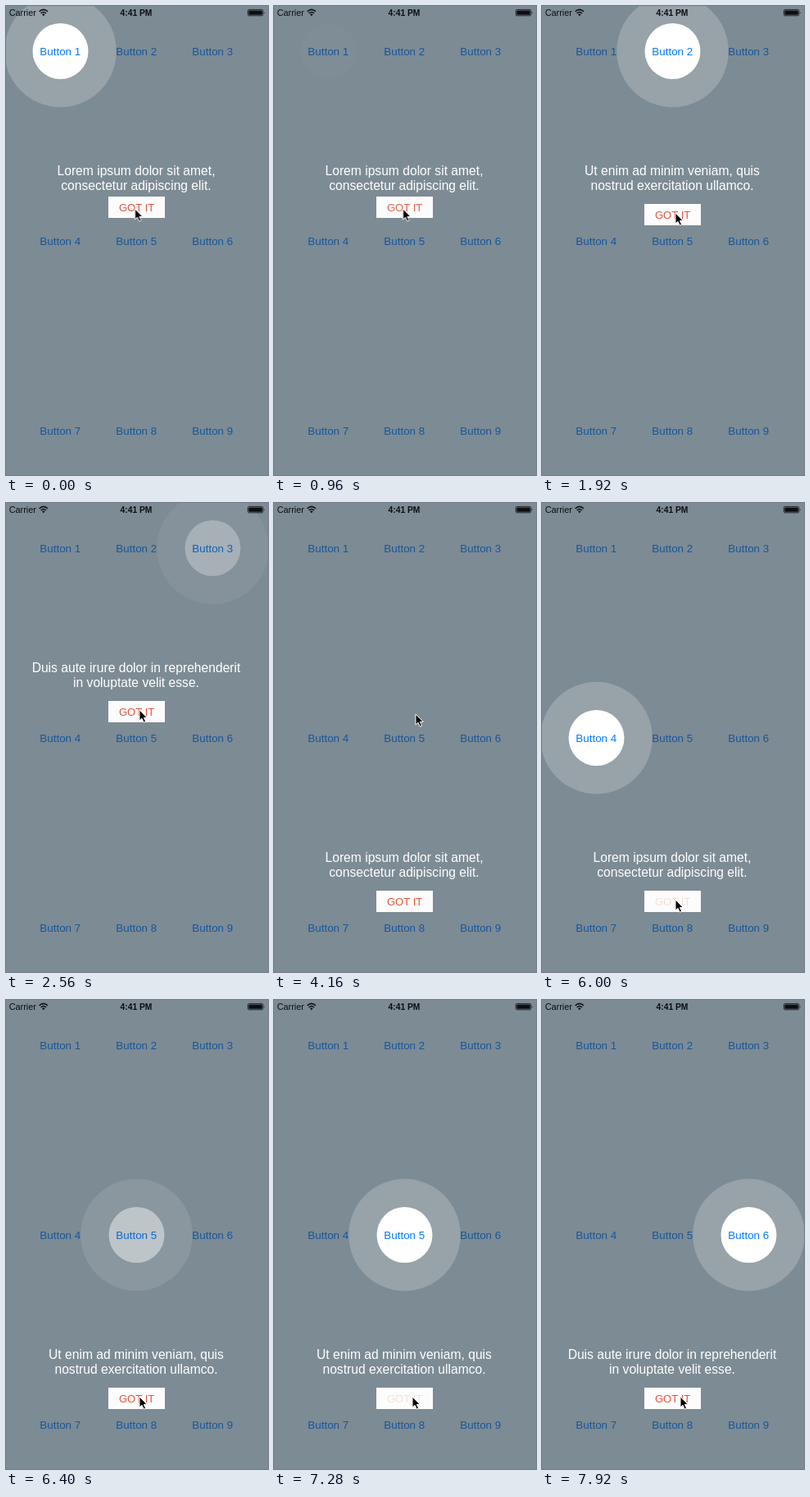
Write an HTML page that moves like this. It is 320 px wide and 571 px high and loops after 8 s.

```html
<!DOCTYPE html>
<html lang="en">
<head>
<meta charset="utf-8">
<title>Coach marks</title>
<style>
  @property --x { syntax: "<length>"; inherits: true; initial-value: 66.5px; }
  @property --y { syntax: "<length>"; inherits: true; initial-value: 55px; }

  html, body { margin: 0; width: 100%; height: 100%; overflow: hidden; background: #7d8b94; }
  body { position: relative; font-family: "Liberation Sans", Arial, sans-serif; }
  svg, div { position: absolute; left: 0; top: 0; width: 320px; height: 571px; }
  text { text-anchor: middle; }

  .labels { font-size: 13.4px; }
  .dim { fill: #17569a; }

  /* spotlight: a halo around a hole through the overlay */
  .focus { animation: spot 8s step-end infinite, fade 8s ease-in-out infinite; }
  .halo { background: #fff; opacity: .2; clip-path: circle(68.3px at var(--x) var(--y)); }
  .hole { background: #fff; fill: #007aff; clip-path: circle(34px at var(--x) var(--y)); }

  .card { animation: drop 8s step-end infinite; }
  .msg { font-size: 15.65px; fill: #fff; opacity: 0; }
  .msg1 { animation: msg1 8s step-end infinite; }
  .msg2 { animation: msg2 8s step-end infinite; }
  .msg3 { animation: msg3 8s step-end infinite; }
  .btn { animation: nudge 8s step-end infinite; }
  .btn text { font-size: 13.1px; fill: #e2553b; animation: press 8s linear infinite; }

  .status { fill: #0c0e10; }
  .cursor { animation: move 8s ease-in-out infinite; }

  @keyframes spot {
    0%      { --x: 66.5px;  --y: 55px; }
    12.25%  { --x: 159.5px; --y: 55px; }
    30.25%  { --x: 252.5px; --y: 55px; }
    51.875% { --x: 66.5px;  --y: 286px; }
    77.75%  { --x: 159.5px; --y: 286px; }
    94.25%, 100% { --x: 252.5px; --y: 286px; }
  }
  @keyframes fade {
    0%, 9.75%, 16.75%, 27.75%, 34.75%, 49.375%, 56.375%,
    75.25%, 82.25%, 91.75%, 98.75%, 100% { opacity: 1; }
    12.25%, 30.25%, 51.875%, 77.75%, 94.25% { opacity: 0; }
  }
  @keyframes drop {
    0% { transform: none; }
    51.875%, 100% { transform: translateY(231px); }
  }
  @keyframes nudge {
    0% { transform: translateY(-9px); }
    12.25%, 100% { transform: translateY(0); }
  }
  @keyframes msg1 {
    0%, 51.875% { opacity: 1; }
    12.25%, 77.75%, 100% { opacity: 0; }
  }
  @keyframes msg2 {
    0%, 30.25%, 94.25%, 100% { opacity: 0; }
    12.25%, 77.75% { opacity: 1; }
  }
  @keyframes msg3 {
    0%, 51.875% { opacity: 0; }
    30.25%, 94.25%, 100% { opacity: 1; }
  }
  @keyframes press {
    0%, 7.74%, 12.25%, 25.74%, 30.25%, 47.36%, 51.875%,
    73.24%, 77.75%, 89.74%, 94.25%, 100% { fill: #e2553b; }
    7.75%, 9.75%, 25.75%, 27.75%, 47.375%, 49.375%,
    73.25%, 75.25%, 89.75%, 91.75% { fill: #f6dfd8; }
  }
  @keyframes move {
    0%, 20.5%   { transform: translate(157.5px, 247px); }
    24%, 37.5%  { transform: translate(163px, 252px); }
    41%, 60.6%  { transform: translate(173px, 257px); }
    70%, 82.5%  { transform: translate(163px, 483px); }
    87%, 100%   { transform: translate(169px, 483px); }
  }
</style>
</head>
<body>
  <svg class="dim" viewBox="0 0 320 571">
    <defs>
      <g id="labels" class="labels">
        <text x="66.3" y="60">Button 1</text>
        <text x="159.3" y="60">Button 2</text>
        <text x="252.3" y="60">Button 3</text>
        <text x="66.3" y="291">Button 4</text>
        <text x="159.3" y="291">Button 5</text>
        <text x="252.3" y="291">Button 6</text>
        <text x="66.3" y="522">Button 7</text>
        <text x="159.3" y="522">Button 8</text>
        <text x="252.3" y="522">Button 9</text>
      </g>
    </defs>
    <use href="#labels"/>
  </svg>

  <div class="focus">
    <div class="halo"></div>
    <svg class="hole" viewBox="0 0 320 571"><use href="#labels"/></svg>
  </div>

  <svg viewBox="0 0 320 571">
    <g class="card">
      <g class="msg msg1">
        <text x="159" y="206">Lorem ipsum dolor sit amet,</text>
        <text x="159" y="224">consectetur adipiscing elit.</text>
      </g>
      <g class="msg msg2">
        <text x="159" y="206">Ut enim ad minim veniam, quis</text>
        <text x="159" y="224">nostrud exercitation ullamco.</text>
      </g>
      <g class="msg msg3">
        <text x="159" y="206">Duis aute irure dolor in reprehenderit</text>
        <text x="159" y="224">in voluptate velit esse.</text>
      </g>
      <g class="btn">
        <rect x="125" y="241" width="69" height="26" fill="#fdfcfd"/>
        <text x="159.6" y="259">GOT IT</text>
      </g>
    </g>

    <g class="status">
      <text x="20.3" y="12" font-size="10.9">Carrier</text>
      <text x="159" y="12" font-size="10.3" font-weight="bold">4:41 PM</text>
      <g fill="none" stroke="#0c0e10" stroke-width="1.5">
        <path d="M40.6 6.8Q45.8 1.9 51 6.8"/>
        <path d="M42.6 9Q45.8 6 49 9"/>
      </g>
      <path d="M45.8 12.2L44 10.3Q45.8 8.9 47.6 10.3Z"/>
      <rect x="295.4" y="4.4" width="18.4" height="7.4" rx="1.4" fill="none" stroke="#0c0e10" stroke-width=".8"/>
      <rect x="296.4" y="5.4" width="16.4" height="5.4" rx=".6"/>
      <path d="M314.9 6.7Q316.5 8.1 314.9 9.5Z"/>
    </g>

    <path class="cursor" d="M0 0V13L3 10.3L5.3 15.2L7.6 14.1L5.4 9.4H9.3Z"
          fill="#000" stroke="#fff" stroke-width="1" stroke-linejoin="round"/>
  </svg>
</body>
</html>
```
